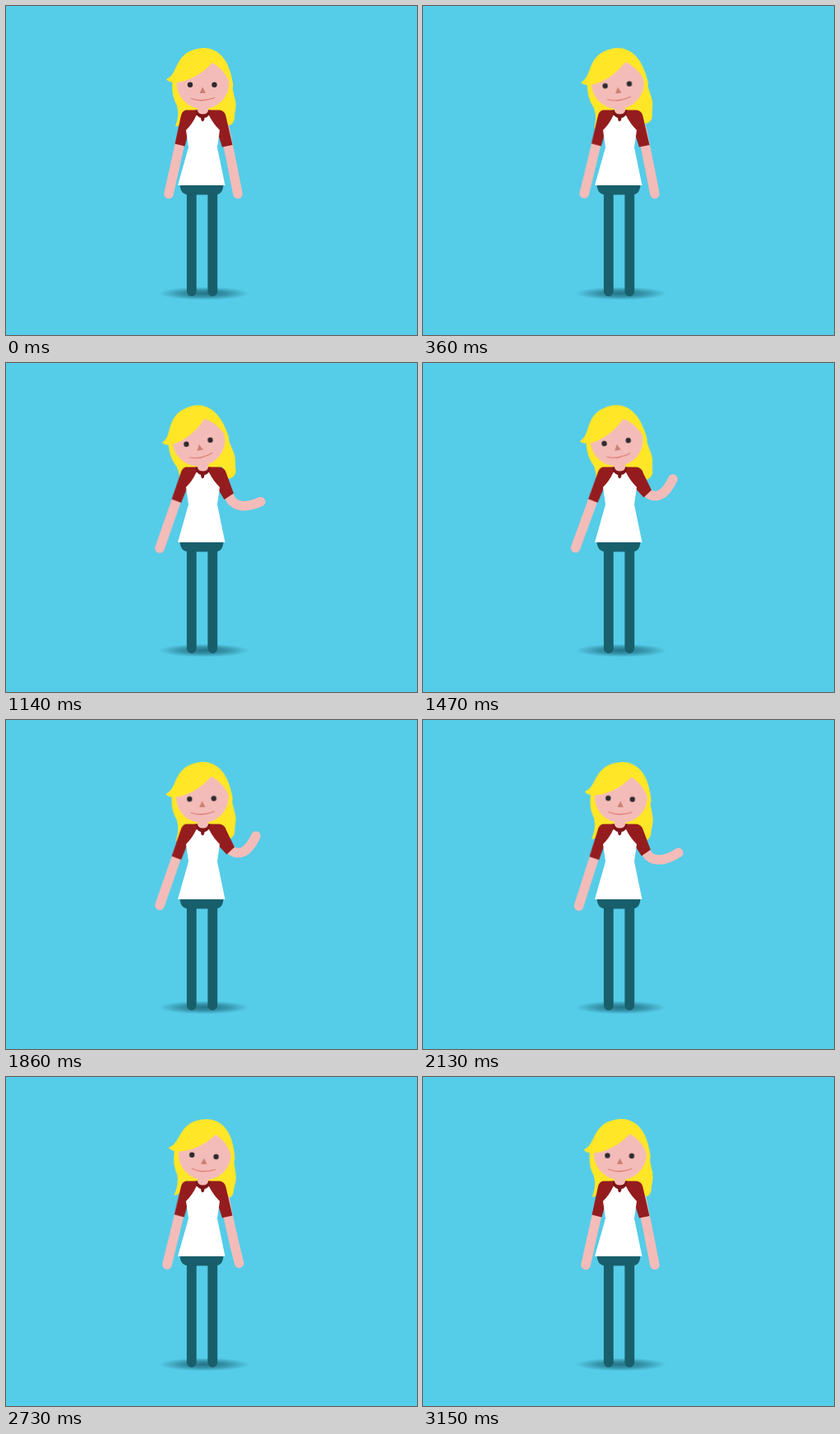
Write an HTML page without scripts that moves like this. It is 500 px wide and 400 px high and loops after 3180 ms.

```html
<!DOCTYPE html>
<html lang="en">
<head>
<meta charset="utf-8">
<title>Waving girl</title>
<style>
  html, body { margin: 0; width: 100%; height: 100%; overflow: hidden; background: #55cce8; }
  svg { display: block; width: 500px; height: 400px; }

  .skin { fill: #f4bcb9; }
  .hair { fill: #ffe627; }
  .red { fill: #951c1e; }
  .jeans { fill: #185f6b; }
  .limb { fill: none; stroke-linecap: round; stroke-linejoin: round; }
  .arm { stroke: #f4bcb9; stroke-width: 11.6; }
  .leg { stroke: #185f6b; stroke-width: 11.8; }

  .head, .swing, .wave, .cuff { animation: 3180ms linear infinite; }
  .head { animation-name: tilt; transform-origin: 239px 124px; }
  .swing { animation-name: swing; transform-origin: 220px 133px; }
  .wave { animation-name: wave; }
  .cuff { animation-name: cuff; }

  @keyframes tilt {
    0% { transform: rotate(0deg); animation-timing-function: cubic-bezier(.39, .575, .565, 1); }
    34.5% { transform: rotate(-9.8deg); animation-timing-function: cubic-bezier(.37, 0, .63, 1); }
    78.6% { transform: rotate(5deg); animation-timing-function: cubic-bezier(.47, 0, .745, .715); }
    100% { transform: rotate(.6deg); }
  }

  @keyframes swing {
    0%, 100% { transform: rotate(0deg); animation-timing-function: cubic-bezier(.37, 0, .63, 1); }
    46.2% { transform: rotate(7.6deg); animation-timing-function: cubic-bezier(.37, 0, .63, 1); }
  }

  /* forearm: rest, swing out, level, raised, and back */
  @keyframes wave {
    0%, 22%, 87.7%, 100% {
      d: path("M266 148 L269.5 166 C274 187 278 208 282 228.5");
      animation-timing-function: ease-in;
    }
    30.2% { d: path("M266 148 L270 164 C274 182 286 197 301 206"); animation-timing-function: linear; }
    35.8% { d: path("M266 148 L271 161 C276 176 292 177 310 169"); animation-timing-function: ease-out; }
    45%, 58.5% {
      d: path("M266 148 L273 158 C282 165 294 163 304 141");
      animation-timing-function: cubic-bezier(.47, 0, .745, .715);
    }
    66.4% { d: path("M266 148 L271.5 161 C278 173 294 172 311 160"); animation-timing-function: linear; }
    74.5% { d: path("M266 148 L270 164 C275 175 287 178 308 177"); animation-timing-function: linear; }
    80.8% { d: path("M266 148 L270 165 C274 182 284 198 298 208"); animation-timing-function: ease-out; }
  }

  @keyframes cuff {
    0%, 22%, 87.7%, 100% {
      d: path("M248 127 H260 Q266 127 267.5 134 L275.5 169 L263 171.5 L256 150 Z");
      animation-timing-function: ease-in;
    }
    30.2% {
      d: path("M248 127 H260 Q266 127 268 134 L276 164 L264 169 L256 150 Z");
      animation-timing-function: linear;
    }
    35.8% {
      d: path("M248 127 H260 Q266 127 268 134 L277 158.5 L265.5 166 L256 150 Z");
      animation-timing-function: ease-out;
    }
    45%, 58.5% {
      d: path("M248 127 H260 Q266 127 268 134 L278 154.5 L268.5 163.5 L256 150 Z");
      animation-timing-function: cubic-bezier(.47, 0, .745, .715);
    }
    66.4% {
      d: path("M248 127 H260 Q266 127 268 134 L277 157.5 L266 165 L256 150 Z");
      animation-timing-function: linear;
    }
    74.5% {
      d: path("M248 127 H260 Q266 127 268 134 L275 161 L264 167.5 L256 150 Z");
      animation-timing-function: linear;
    }
    80.8% {
      d: path("M248 127 H260 Q266 127 268 134 L275 165 L263.5 169.5 L256 150 Z");
      animation-timing-function: ease-out;
    }
  }
</style>
</head>
<body>
<svg viewBox="0 0 500 400">
  <defs>
    <radialGradient id="shade">
      <stop offset="0" stop-color="#1b6476" stop-opacity=".85"/>
      <stop offset=".5" stop-color="#1b6476" stop-opacity=".55"/>
      <stop offset="1" stop-color="#1b6476" stop-opacity="0"/>
    </radialGradient>
  </defs>

  <rect width="500" height="400" fill="#55cce8"/>
  <ellipse cx="241" cy="349.5" rx="55" ry="8" fill="url(#shade)"/>

  <g class="head">
    <path class="hair" d="M238 56 L203 86 C201 104 203 111 207.5 120 C210.500 130 209 138 206 146.500 C212 145.500 216 141 218 135 L262 130 L266 146 C273 146 277 143 278 137 C277.500 130 281 125 279 115 C277 106 275 100 275 90 Z"/>
  </g>

  <path class="limb leg" d="M225.800 226 V347 M251.300 226 V347"/>
  <path class="jeans" d="M211.500 217 H264.500 Q264 229.500 254 229.500 H222 Q212 229 211.500 217 Z"/>

  <g class="swing">
    <path class="limb arm" d="M215 152 L198 228.500"/>
    <path class="red" d="M230 127 H219 Q214.500 127 213 133 L205.500 167.500 L217.500 170.500 L223 150 Z"/>
  </g>
  <path class="limb arm wave" d="M266 148 L269.500 166 C274 187 278 208 282 228.500"/>
  <path class="red cuff" d="M248 127 H260 Q266 127 267.500 134 L275.500 169 L263 171.500 L256 150 Z"/>

  <path class="red" d="M219 126.500 H260 Q264 127 265 131 L258 152 H221 L215 131 Q216 127 219 126.500 Z"/>
  <path fill="#fff" d="M231.500 133 Q227 143 219 151 L222 172 L209 218 H266.500 L257 172 L260 151 Q252 143 247 133 Z"/>
  <path fill="#7c1519" d="M230.500 126.500 H248.500 Q247.500 135.500 241.500 136 L241 139 L239 140.500 L237.500 139 L237 136 Q231.500 135 230.500 126.500 Z"/>
  <path class="skin" d="M233 118 H246 V127 Q245 131.500 239.500 131.500 Q234 131.500 233 127 Z"/>

  <g class="head">
    <ellipse class="skin" cx="239.500" cy="94" rx="32" ry="31"/>
    <path class="hair" d="M195 89 C211 83 203 54 240 51 C262 51 273 70 276.500 97 L274.500 102 C272 88 264 76 251 69 C238 83 220 93 205 93 Q198 93 195 89 Z"/>
    <g fill="#2c2a2e">
      <circle cx="224" cy="95.700" r="3.200"/>
      <circle cx="253.500" cy="95.700" r="3.200"/>
    </g>
    <path fill="#c98173" d="M239.200 98.500 L243 106 H235.500 Z"/>
    <path class="limb" stroke="#dc7a70" stroke-width="1.300" d="M225.500 112.500 Q239.500 117.500 253.500 111.500"/>
  </g>
</svg>
</body>
</html>
```
